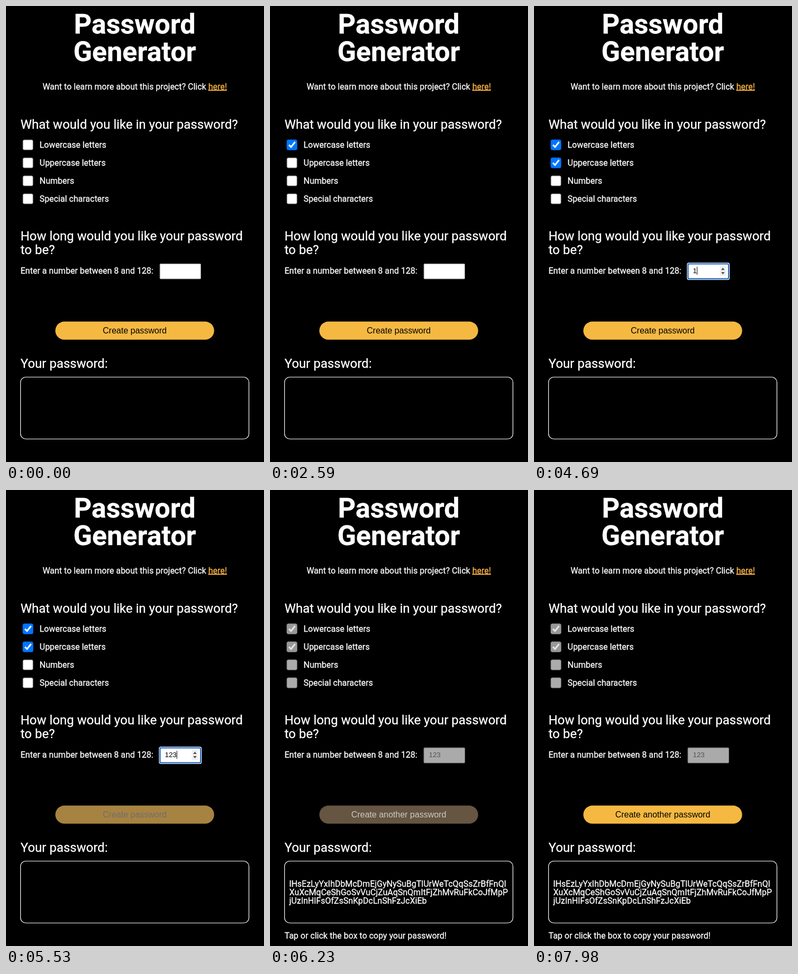
These frames come from a looping animation (488 px wide and 862 px high, 8 s). An HTML page:

```html
<!DOCTYPE html>
<html lang="en">
<head>
<meta charset="utf-8">
<title>Password Generator</title>
<style>
  html, body { margin: 0; width: 100%; height: 100%; overflow: hidden; background: #000; }
  svg { display: block; width: 488px; height: 862px; }
  text { font: 16px Roboto, sans-serif; fill: #fff; stroke: #fff; stroke-width: .3px; white-space: pre; }
  .title { font-size: 52px; font-weight: 700; text-anchor: middle; }
  .heading { font-size: 24px; }
  .link { fill: #fbb545; stroke: #fbb545; text-decoration: underline; }
  .control { font-family: "Liberation Sans", Arial, sans-serif; stroke: none; }
  .middle { text-anchor: middle; }
  #value { font-size: 13.333px; }
</style>
</head>
<body>
<svg viewBox="0 0 488 862">
  <text class="title" x="243.5" y="52">Password</text>
  <text class="title" x="243.5" y="104">Generator</text>
  <text class="middle" x="243.5" y="157.5">Want to learn more about this project? Click <tspan class="link">here!</tspan></text>

  <text class="heading" x="27.5" y="232">What would you like in your password?</text>
  <g id="options"></g>

  <text class="heading" x="27.5" y="442.5">How long would you like your password</text>
  <text class="heading" x="27.5" y="469">to be?</text>
  <text x="27.5" y="506">Enter a number between 8 and 128:</text>

  <g id="ring">
    <rect x="289.3" y="485.3" width="80.8" height="32.4" rx="3.5" fill="#fff"/>
    <rect x="290.4" y="486.4" width="78.6" height="30.2" rx="2.5" fill="#0f60c6"/>
  </g>
  <rect id="field" stroke="#767676"/>
  <g id="spinner">
    <rect x="351.5" y="491.5" width="11.5" height="19" rx="2" fill="#f0f0f0"/>
    <path d="M354 499l3.3-4.2 3.3 4.2zM354 503l3.3 4.2 3.3-4.2z" fill="#4d4d4d"/>
  </g>
  <text id="value" class="control" x="300.5" y="505"></text>
  <rect id="caret" y="493" width="1" height="15" fill="#000"/>

  <rect id="button" x="93.3" y="596.6" width="300.4" height="34.2" rx="17.1"/>
  <text id="caption" class="control middle" x="243.5" y="619"></text>

  <text class="heading" x="27.5" y="684">Your password:</text>
  <rect x="27.5" y="701.5" width="432" height="117" rx="10" fill="none" stroke="#fff" stroke-width="1.2"/>
  <g id="result">
    <text x="36.5" y="750">lHsEzLyYxIhDbMcDmEjGyNySuBgTlUrWeTcQqSsZrBfFnQl</text>
    <text x="36.5" y="766">XuXcMqCeShGoSvVuCjZuAqSnQmItFjZhMvRuFkCoJfMpP</text>
    <text x="36.5" y="782">jUzInHlFsOfZsSnKpDcLnShFzJcXiEb</text>
    <text x="27.5" y="847.5">Tap or click the box to copy your password!</text>
  </g>
</svg>
<script>
const LOOP = 8000, STEP = 70, FADE = 250;
const SUBMIT = 6090;
const never = [Infinity, Infinity];

const options = [
  { label: 'Lowercase letters', hover: [1890, 2590], checked: 2100 },
  { label: 'Uppercase letters', hover: [2730, 3360], checked: 3080 },
  { label: 'Numbers', hover: [3360, 3430], checked: Infinity },
  { label: 'Special characters', hover: never, checked: Infinity }
];
const input = { hover: 3920, focus: 4340, typed: [4690, 4970, 5250], caretOff: 5740 };
const buttonHovers = [[5465, SUBMIT], [6107, 7203]];

const normal = { fill: [245, 185, 66], text: [0, 0, 0] };
const hovered = { fill: [64, 59, 65], text: [255, 255, 255] };

const $ = id => document.getElementById(id);
const within = (t, [from, to]) => t >= from && t < to;
const show = (id, on) => $(id).setAttribute('visibility', on ? 'visible' : 'hidden');
const set = (el, attrs) => {
  for (const name in attrs) el.setAttribute(name, attrs[name]);
};
const mix = (a, b, k) => `rgb(${a.map((v, i) => Math.round(v + (b[i] - v) * k))})`;

// CSS "ease": cubic-bezier(.25, .1, .25, 1)
function ease(x) {
  if (x <= 0) return 0;
  if (x >= 1) return 1;
  const curve = (a, b, u) => 3 * a * u * (1 - u) ** 2 + 3 * b * u * u * (1 - u) + u ** 3;
  let low = 0, high = 1;
  for (let i = 0; i < 20; i++) {
    const mid = (low + high) / 2;
    if (curve(.25, .25, mid) < x) low = mid; else high = mid;
  }
  return curve(.1, 1, low);
}

$('options').innerHTML = options.map(({ label }, i) => `
  <g transform="translate(0 ${34 * i})">
    <rect class="box" x="32" y="253" width="19" height="19" rx="2.5"/>
    <path class="tick" d="M35.8 262.6l4 4 7.6-9.6" fill="none" stroke-width="3"/>
    <text x="63.5" y="268">${label}</text>
  </g>`).join('');
const boxes = document.querySelectorAll('.box');
const ticks = document.querySelectorAll('.tick');

function drawOption(option, i, t) {
  const done = t >= SUBMIT, on = t >= option.checked, hover = within(t, option.hover);
  const blue = hover ? '#005cc8' : '#0075ff';
  const fill = done ? (on ? '#989898' : '#ababab') : on ? blue : '#fff';
  const border = done ? (on ? '#989898' : '#8a8a8a') : on ? blue : hover ? '#4f4f4f' : '#767676';
  set(boxes[i], { fill, stroke: border });
  set(ticks[i], { stroke: done ? '#e6e6e6' : '#fff', visibility: on ? 'visible' : 'hidden' });
}

function drawInput(t) {
  const done = t >= SUBMIT, focus = within(t, [input.focus, SUBMIT]);
  const digits = input.typed.filter(at => t >= at).length;
  show('ring', focus);
  show('spinner', within(t, [input.hover, SUBMIT]));
  show('caret', focus && t < input.caretOff);
  set($('field'), focus
    ? { x: 292.4, y: 488.4, width: 74.6, height: 26.2, rx: 1, fill: '#fff', 'stroke-width': 0 }
    : { x: 291, y: 487.2, width: 77.5, height: 28.8, rx: 1.5, fill: done ? '#aaa' : '#fff', 'stroke-width': 1 });
  $('field').setAttribute('stroke', within(t, [input.hover, input.focus]) ? '#4f4f4f' : '#767676');
  $('value').textContent = '123'.slice(0, digits);
  $('value').style.fill = done ? '#555' : '#000';
  $('caret').setAttribute('x', 300.5 + 7.415 * digits);
}

function drawButton(t) {
  const [from, to] = buttonHovers[t < SUBMIT ? 0 : 1];
  const leave = t < SUBMIT ? 0 : ease((t - to) / FADE);
  const k = ease((t - from) / FADE) - leave;
  $('button').setAttribute('fill', mix(normal.fill, hovered.fill, k));
  $('caption').style.fill = mix(normal.text, hovered.text, k);
  $('caption').textContent = t < SUBMIT ? 'Create password' : 'Create another password';
}

function draw(t) {
  options.forEach((option, i) => drawOption(option, i, t));
  drawInput(t);
  drawButton(t);
  show('result', t >= SUBMIT);
}

const start = performance.now();
function tick(now) {
  const t = Math.max(0, now - start) % LOOP;
  draw(Math.floor(t / STEP) * STEP);
  requestAnimationFrame(tick);
}
draw(0);
requestAnimationFrame(tick);
</script>
</body>
</html>
```
